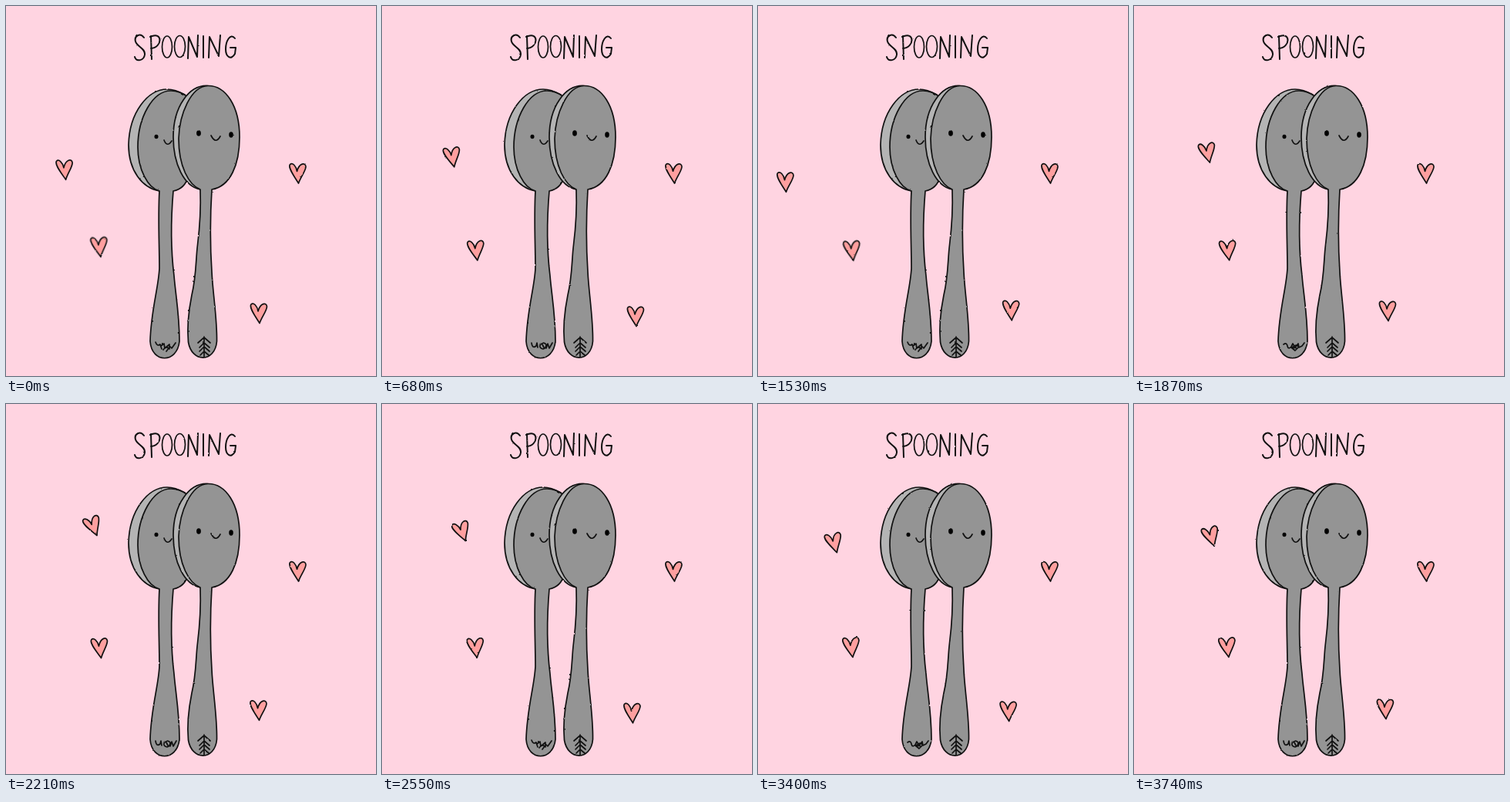
An HTML page for the animation above (3910 ms loop, 480 px wide and 480 px high).

```html
<!DOCTYPE html>
<html lang="en">
<head>
<meta charset="utf-8">
<title>Spooning</title>
<style>
  html, body { margin: 0; width: 100%; height: 100%; overflow: hidden; background: #ffd4e1; }
  svg { display: block; width: 100%; height: 100%; }
  path, .title ellipse { fill: none; stroke: #111; stroke-width: 1.7; stroke-linecap: round; stroke-linejoin: round; }
  .title > * { stroke-width: 2; }
  .rim { fill: #b4b4b4; }
  .body { fill: #949494; }
  .heart { fill: #ff9f9f; }
</style>
</head>
<body>
<svg viewBox="0 0 480 480" role="img" aria-label="Spooning">
  <defs id="defs"></defs>
  <g id="scene">
    <g class="title">
      <path d="M179 41C174 34 166 39 168 46S181 55 180 63 169 73 167 66"/>
      <path d="M188 39L189 69M187 40C204 32 203 54 188 55"/>
      <ellipse cx="209" cy="53" rx="6.5" ry="14"/>
      <ellipse cx="225.5" cy="52.5" rx="7" ry="14"/>
      <path d="M236 68L237 40 248 66 249 38M256 39L256 67M263 67L264 40 276 65 278 38"/>
      <path d="M297 42C291 34 285 46 285 56S292 71 297 62L298 54 291 54"/>
    </g>
    <g>
      <path class="rim" d="M232 115C225 111 217 108 209 108C184 108 160 138 159 180C159 214 177 236 199 240"/>
      <path class="body" d="M217 240Q232 237 236 222L236 118Q225 110 214 110C190 110 171 145 171 183C171 212 184 236 199 240
        C197 275 199 310 199 340C198 365 188 395 187 435C189 464 222 464 225 435C225 400 220 375 218 350C213 310 214 275 217 240Z"/>
      <ellipse cx="195" cy="169.5" rx="2.5" ry="2.8"/>
      <path d="M205 174Q209 184 215 175"/>
      <path id="mark"/>
    </g>
    <g>
      <path class="rim" d="M262 103.5C238 102 217 130 217 170C217 205 231 234 252 238"/>
      <path class="body" d="M267 238C291 234 303 206 303 170C303 130 285 103 262 103.5C240 104 225 140 224 172C224 208 237 232 252 238
        C253 265 251 290 248.5 310C246 330 247 350 241 375C237 395 235 420 236.5 436C241 463 271 463 273.5 435C274 405 268 370 267 345C265 315 265 270 267 238Z"/>
      <ellipse cx="250" cy="165" rx="2.9" ry="3.8"/>
      <ellipse cx="292" cy="167" rx="2.8" ry="3.7"/>
      <path d="M266 168Q272 180 278 169"/>
      <path d="M249 437l8-7 8 7M251 443l6-6 7 6M251 448l6-6 7 6M252 453l5-5 6 5M257 429l0 26"/>
    </g>
    <g id="hearts"></g>
  </g>
</svg>
<script>
const STEP = 170, COUNT = 23;
const $ = id => document.getElementById(id);

// The three hand-drawn takes differ in line wobble and in this engraving
const marks = [
  'M194 436q2 6 6 3l2 6M201 441l4-3 1 6 6-5 0 6M204 446q3-5 7-2l-3 4M212 441l3 3 5-7',
  'M194 437q1 8 6 4l1-4 1 6M205 440q4-5 8-1 0 5-4 6-5-1-4-5M208 439l2 4M213 444l2-6 2 6 4-7',
  'M194 439q4-3 5 2t5 1l2-4 3 5 4-5 1 5 4-2 3-4M204 443l5 4 5-5-4-2-5 3 7 1'
];
$('defs').innerHTML = marks.map((_, i) => `
  <filter id="rough${i}" x="0" y="0" width="480" height="480" filterUnits="userSpaceOnUse" color-interpolation-filters="sRGB">
    <feTurbulence type="fractalNoise" baseFrequency="0.15" numOctaves="2" seed="${i + 4}"/>
    <feDisplacementMap in="SourceGraphic" scale="1.7" xChannelSelector="R" yChannelSelector="G"/>
  </filter>`).join('');

$('hearts').innerHTML =
  '<path class="heart" d="M-1-2C-2-9-7-14-10-11C-13-7-5 4 1 13.5C4 5 10-2 10.5-8C10-14 2-13-1-2Z"/>'.repeat(4);
const [swinger, still, lowLeft, lowRight] = $('hearts').children;

// Turning points: [step, x, lift above the arc]
const swing = [[0, 76, 0], [2, 52, 0], [5, 104, 0], [8.6, 33, 0], [12.2, 116, 0], [14.5, 104, 14], [17.3, 97, -2], [22.5, 100, 12]];
// Turning points: [step, x, y]
const leftDrift = [[0, 121, 312], [5, 122, 317], [22, 121, 315]];
const rightDrift = [[0, 328, 398], [4, 329, 402], [8, 328, 394], [11, 329, 395], [17, 323, 402], [22.5, 326, 395]];

// Cosine easing from one turning point to the next
function ease(keys, n) {
  const k = Math.max(1, keys.findIndex(key => key[0] >= n));
  const a = keys[k - 1], b = keys[k];
  const f = (1 - Math.cos(Math.PI * (n - a[0]) / (b[0] - a[0]))) / 2;
  return [1, 2].map(j => a[j] + (b[j] - a[j]) * f);
}

function place(el, [x, y], turn = 0) {
  el.setAttribute('transform', `translate(${x} ${y}) rotate(${turn})`);
}

let shown = -1;
function draw(n) {
  const take = n % 3;
  $('scene').setAttribute('filter', `url(#rough${take})`);
  $('mark').setAttribute('d', marks[take]);

  const [x, lift] = ease(swing, n);
  const y = 228 - (x - 40) ** 2 / 80 - lift;
  place(swinger, [x, y], Math.min(0, (y - 220) * 0.3));
  place(still, [378.5, 216.5]);
  place(lowLeft, ease(leftDrift, n), -4);
  place(lowRight, ease(rightDrift, n));
}

const begin = performance.now();
function tick() {
  const n = Math.floor((performance.now() - begin) / STEP) % COUNT;
  if (n !== shown) draw(shown = n);
  requestAnimationFrame(tick);
}
tick();
</script>
</body>
</html>
```
